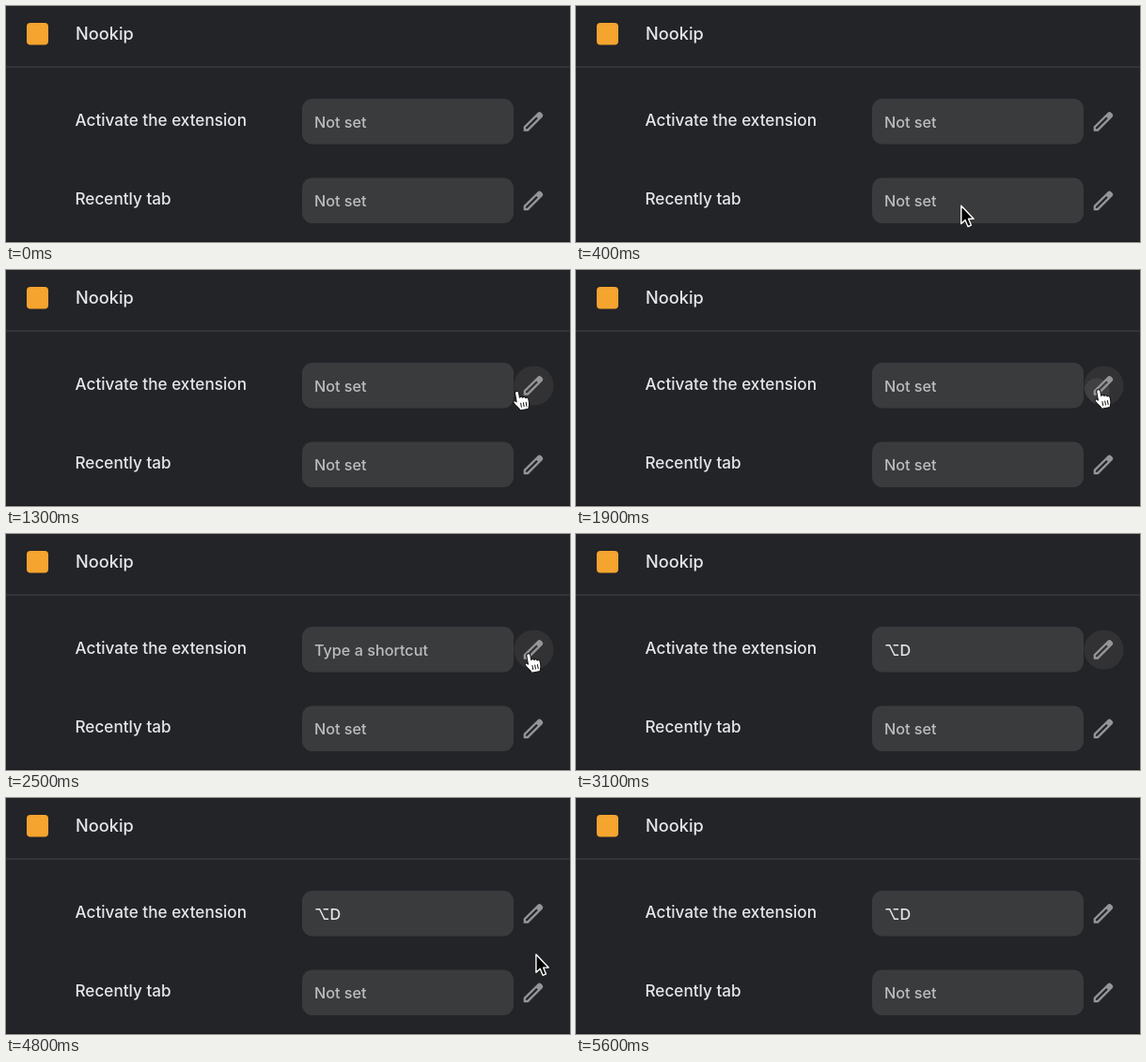
An HTML page for the animation above (5700 ms loop, 600 px wide and 252 px high).

```html
<!DOCTYPE html>
<html lang="en">
<head>
<meta charset="utf-8">
<title>Shortcut settings</title>
<style>
  html, body { margin: 0; width: 100%; height: 100%; overflow: hidden; background: #232428; }
  svg { display: block; width: 100%; height: 100%; font-family: Inter, "Noto Sans", "DejaVu Sans", sans-serif; }
  .title { font-size: 18.2px; font-weight: 500; fill: #e6e7ea; }
  .label { font-size: 17.15px; font-weight: 450; fill: #e6e7ea; }
  .value { font-size: 16.2px; font-weight: 450; fill: #bcbdc0; }
  .value.set { fill: #e6e7ea; }
  .field { fill: #3a3b3d; }
  .pencil { fill: #949598; }
</style>
</head>
<body>
<svg viewBox="0 0 600 252">
  <defs>
    <path id="pencil" d="M5 19h1.4l9.8-9.8-1.4-1.4L5 17.6zm-2 2v-4.25L16.2 3.6q1.4-1.2 2.85 0L20.4 5q1.2 1.4 0 2.8L7.25 21z"/>
    <clipPath id="button"><circle cx="561.5" cy="123.5" r="21.3"/></clipPath>
  </defs>
  <rect width="600" height="252" fill="#232428"/>
  <rect x="22" y="18" width="23" height="23.5" rx="4" fill="#f4a42f"/>
  <text class="title" x="74" y="36">Nookip</text>
  <rect y="64.5" width="600" height="1.2" fill="#3d3e41"/>
  <rect y="251" width="600" height="1" fill="#1a1b1e"/>

  <text class="label" x="73.5" y="127.5">Activate the extension</text>
  <rect class="field" x="315" y="99" width="225" height="48.5" rx="11"/>
  <text class="value" id="value" x="328" y="129.6"></text>
  <rect id="caret" x="328.5" y="114.5" width="1.5" height="18" fill="#8ab4f8"/>

  <text class="label" x="73.5" y="212">Recently tab</text>
  <rect class="field" x="315" y="183.5" width="225" height="48.5" rx="11"/>
  <text class="value" x="328" y="214">Not set</text>

  <g id="hover" clip-path="url(#button)">
    <circle cx="561.5" cy="123.5" r="21.3" fill="#323133"/>
    <circle id="ripple" cx="554" cy="129" fill="#fff"/>
  </g>
  <use class="pencil" href="#pencil" transform="translate(547.2 109.5) scale(1.15)"/>
  <use class="pencil" href="#pencil" transform="translate(547.2 194) scale(1.15)"/>

  <path id="arrow" d="M.6 .8V20l4.3-4 2.9 7 3.4-1.4-2.9-6.8h5.6z" fill="#000" stroke="#fff" stroke-width="1.4" stroke-linejoin="round"/>
  <g id="hand">
    <g transform="translate(-1 -1) rotate(-10)" stroke="#111" stroke-linejoin="round" stroke-linecap="round">
      <path d="M-2 1.6C-2-.9 2-.9 2 1.6V7c.5-1.2 3-1 3.2.6 .8-1 2.8-.6 3 1 1.2-.8 2.8 0 2.8 1.6v4c0 3-1.5 4-1.7 6.3H.2C0 18-3 16-5 11.5c-1-2.2 1.4-3 3-.5z" fill="#fff"/>
      <path d="M2.2 13v4.2M5 13v4.2M7.8 13v4.2" fill="none"/>
    </g>
  </g>
</svg>
<script>
const LOOP = 5700, STEP = 100;
const $ = id => document.getElementById(id);
const show = (id, on) => $(id).setAttribute('display', on ? 'inline' : 'none');
const clamp = k => Math.min(1, Math.max(0, k));
const ease = k => k * k * (3 - 2 * k);
const progress = (t, from, to) => clamp((t - from) / (to - from));

// The pointer rests between these moves
const moves = [
  { from: 100, to: 800, x: 431, y: 147 },
  { from: 800, to: 1420, x: 556.5, y: 129 },
  { from: 3600, to: 3900, x: 558.5, y: 139 },
  { from: 4100, to: 4700, x: 563.3, y: 166.3 },
  { from: 5000, to: 5600, x: 612, y: 215 }
];

function pointerAt(t) {
  let x = 395, y = 255;
  for (const m of moves) {
    const k = ease(progress(t, m.from, m.to));
    x += (m.x - x) * k;
    y += (m.y - y) * k;
  }
  return { x, y };
}

function valueAt(t) {
  if (t < 2000) return 'Not set';
  if (t < 2800) return 'Type a shortcut';
  return t < 3000 ? '⌥' : '⌥D';
}

function draw(t) {
  const { x, y } = pointerAt(t);
  const typing = t >= 2800 && t < 3700;
  const over = Math.hypot(x - 561.5, y - 123.5) < 22;
  show('arrow', t >= 200 && !typing && !over);
  show('hand', over && !typing);
  for (const id of ['arrow', 'hand']) $(id).setAttribute('transform', `translate(${x} ${y})`);

  show('hover', over);
  const k = progress(t, 1800, 2200);
  $('ripple').setAttribute('r', k && 4 + 38 * k);
  $('ripple').setAttribute('opacity', 0.09 * (1 - k));

  $('value').textContent = valueAt(t);
  $('value').classList.toggle('set', t >= 2800);
  show('caret', t >= 2000 && t < 2500);
}

const start = performance.now();
function tick() {
  const t = (performance.now() - start) % LOOP;
  draw(Math.floor(t / STEP) * STEP);
  requestAnimationFrame(tick);
}
tick();
</script>
</body>
</html>
```
